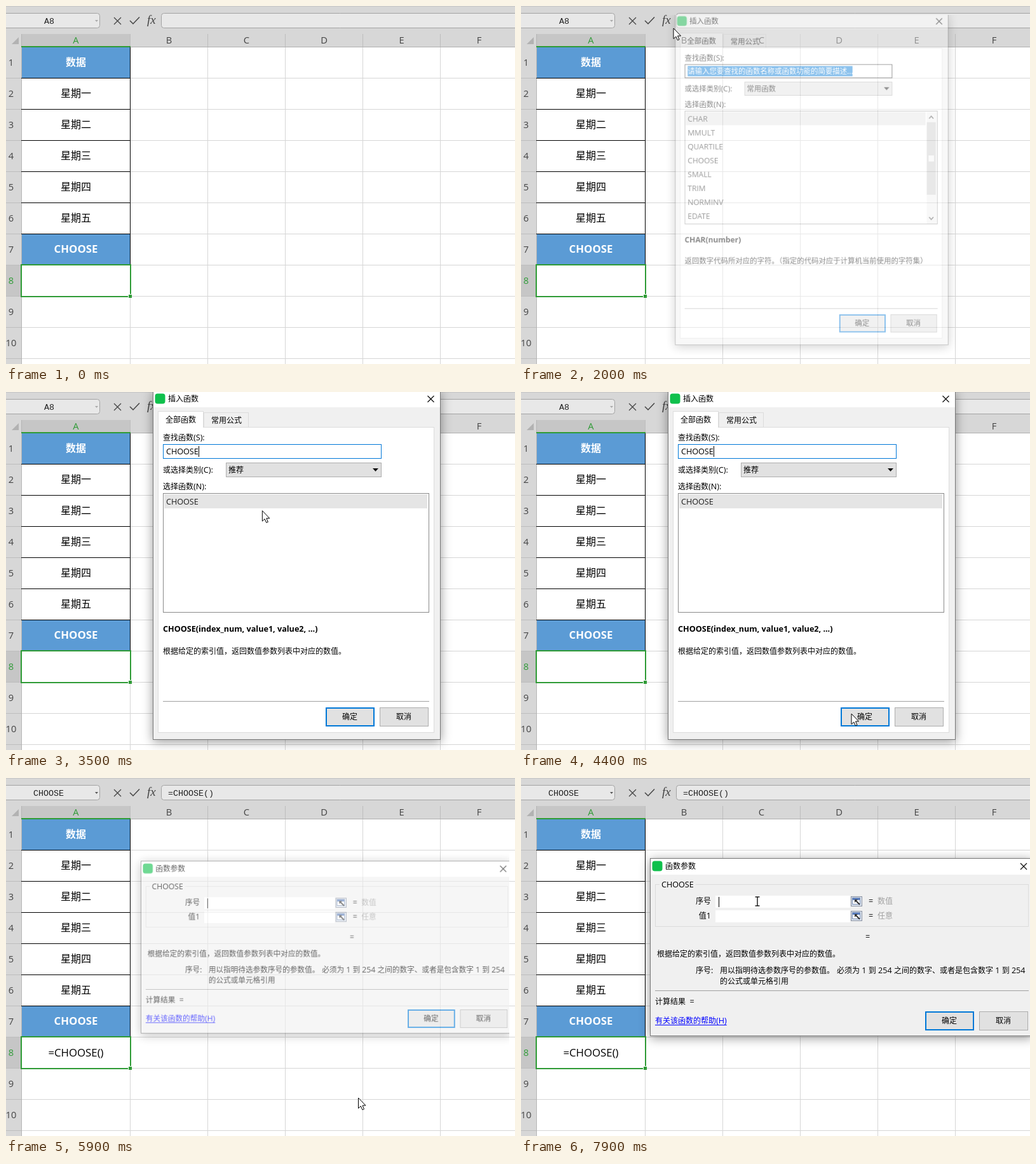
Animation of 801x563 px, one loop 8000 ms. Source, as an HTML page with a canvas:

```html
<!DOCTYPE html>
<html lang="zh">
<head>
<meta charset="utf-8">
<style>
html, body { margin: 0; width: 100%; height: 100%; overflow: hidden; background: #fff; }
canvas { display: block; }
</style>
</head>
<body>
<canvas id="stage" width="801" height="563"></canvas>
<script>
const W = 801, H = 563, LOOP = 8000, STEP = 100;
const SANS = '"Open Sans", "Noto Sans CJK SC", "Noto Sans CJK", "Noto Sans", sans-serif';
const MONO = '"Liberation Mono", monospace';
const BLUE = '#0078d7', GREEN = '#2f9b36';
const screen = document.getElementById('stage').getContext('2d');
const layer = Object.assign(document.createElement('canvas'), { width: W, height: H }).getContext('2d');
let g = screen;

function fill(x, y, w, h, color) {
  g.fillStyle = color;
  g.fillRect(x, y, w, h);
}

// Box whose border lies inside its outer size.
function box(x, y, w, h, back, border, weight = 1) {
  fill(x, y, w, h, border);
  fill(x + weight, y + weight, w - 2 * weight, h - 2 * weight, back);
}

function rounded(x, y, w, h, r, back, border) {
  g.beginPath();
  g.roundRect(x, y, w, h, r);
  g.fillStyle = back;
  g.fill();
  if (border) { g.strokeStyle = border; g.lineWidth = 1; g.stroke(); }
}

function path(points, { back, line, width = 1, close = false }) {
  g.beginPath();
  points.forEach(([x, y]) => g.lineTo(x, y));
  if (close) g.closePath();
  if (back) { g.fillStyle = back; g.fill(); }
  if (line) { g.strokeStyle = line; g.lineWidth = width; g.stroke(); }
}

// Latin runs are set slightly larger than the CJK runs beside them.
function text(str, x, y, { size = 12, color = '#000', weight = 400, align = 0 } = {}) {
  const runs = str.match(/[\u2e80-\uffef]+|[^\u2e80-\uffef]+/g) || [];
  const parts = runs.map(run => {
    const font = `${weight} ${/[\u2e80-\uffef]/.test(run) ? size : size * 1.05}px ${SANS}`;
    g.font = font;
    return { run, font, width: g.measureText(run).width };
  });
  const total = parts.reduce((sum, p) => sum + p.width, 0);
  let left = x - total * align;
  g.fillStyle = color;
  for (const p of parts) {
    g.font = p.font;
    g.fillText(p.run, left, y);
    left += p.width;
  }
  return total;
}

function mono(str, x, y) {
  g.font = `13.33px ${MONO}`;
  g.fillStyle = '#222';
  g.fillText(str, x, y);
}

function cross(x, y, r, color, width) {
  path([[x - r, y - r], [x + r, y + r]], { line: color, width });
  path([[x + r, y - r], [x - r, y + r]], { line: color, width });
}

function button(label, x, y, state) {
  if (state === 'default') box(x, y, 77, 30, '#e1e1e1', BLUE, 2);
  else if (state === 'hover') box(x, y, 77, 30, '#e5f1fb', BLUE);
  else box(x, y, 77, 30, '#e1e1e1', '#adadad');
  text(label, x + 38, y + 19, { align: 0.5 });
}

const between = (t, a, b) => t >= a && t < b;
const blink = (t, start) => Math.floor((t - start) / 500) % 2 === 0;

function toolbar(t) {
  const editing = t >= 5900;
  fill(0, 0, W, 65, '#d7d7d7');
  fill(0, 0, W, 1, '#c6c6c6');
  rounded(-4.5, 11.5, 152, 23, 4, '#e8e8e8', '#a3a3a3');
  rounded(244.5, 11.5, 580, 23, 4, '#e8e8e8', '#a3a3a3');
  mono(editing ? 'CHOOSE' : 'A8', editing ? 43 : 60, 28);
  path([[140, 22], [145, 22], [142.5, 25]], { back: editing ? '#555' : '#aaa', close: true });
  if (between(t, 1600, 2000)) rounded(216, 11, 24, 24, 4, '#a0a0a0');
  cross(175.5, 23.5, 5.5, '#444', 1.3);
  path([[195, 23], [200, 28], [210, 17.5]], { line: '#444', width: 1.5 });
  g.font = 'italic 19px "Liberation Serif", serif';
  g.fillStyle = '#444';
  g.fillText('fx', 222, 28);
  if (editing) mono('=CHOOSE()', 255, 28);
}

function sheet(t) {
  fill(0, 0, W, H, '#fff');
  toolbar(t);
  fill(0, 65, 24, H, '#d7d7d7');
  fill(25, 44, 171, 20, '#c6c6c6');
  fill(0, 408, 24, 49, '#c6c6c6');
  fill(24, 64, W, 1, '#b0b0b0');
  fill(24, 44, 1, H, '#b5b5b5');
  path([[20, 49], [20, 60], [9, 60]], { back: '#b2b2b2', close: true });

  for (let i = 0; i < 5; i++) {
    fill(195 + 122 * i, 44, 1, 20, '#bdbdbd');
    fill(195 + 122 * i, 65, 1, H, '#d6d6d6');
  }
  [...'ABCDEF'].forEach((name, i) =>
    text(name, i ? 134.5 + 122 * i : 110, 59, { size: 14, color: i ? '#444' : GREEN, align: 0.5 }));

  const cells = ['数据', '星期一', '星期二', '星期三', '星期四', '星期五', 'CHOOSE'];
  for (let row = 0; row < 11; row++) {
    const top = 64 + 49 * row;
    fill(0, top + 49, 24, 1, '#bdbdbd');
    fill(25, top + 49, W, 1, '#d6d6d6');
    if (row < 10) text(`${row + 1}`, 8, top + 30, { size: 14, color: row === 7 ? GREEN : '#444', align: 0.5 });
  }
  cells.forEach((label, row) => {
    const top = 64 + 49 * row, head = row === 0 || row === 6;
    if (head) fill(25, top + 1, 170, 48, '#5b9bd5');
    fill(24, top + 49, 172, 1, '#000');
    fill(195, top + 1, 1, 49, '#000');
    text(label, 110, top + 30, { size: 16, color: head ? '#fff' : '#000', weight: head ? 700 : 400, align: 0.5 });
  });

  fill(24, 63, 172, 2, GREEN);
  g.strokeStyle = GREEN;
  g.lineWidth = 2;
  g.strokeRect(24, 407, 172, 50);
  fill(192, 453, 6, 6, '#fff');
  fill(193, 454, 5, 5, GREEN);
  if (t >= 5900) text('=CHOOSE()', 110, 438, { size: 16, align: 0.5 });
  else if (between(t, 800, 1200) || between(t, 1700, 2000)) fill(110, 421, 1, 23, '#000');
}

function windowFrame(x, y, w, h, title) {
  g.save();
  g.shadowColor = 'rgba(0,0,0,.4)';
  g.shadowBlur = 16;
  g.shadowOffsetY = 3;
  fill(x, y, w, h, '#777');
  g.restore();
  fill(x + 1, y + 1, w - 2, h - 2, '#f0f0f0');
  fill(x + 1, y + 1, w - 2, 25, '#fff');
  rounded(x + 3.5, y + 4.5, 16, 16, 4, '#0fc04c');
  text(title, x + 24, y + 17);
}

function searchDialog(t) {
  const searched = t >= 3100, clicked = t >= 5600;
  windowFrame(231, -2, 453, 549, '插入函数');
  cross(668.5, 11, 5, '#111', 1.2);
  box(239, 55, 435, 481, '#fff', '#dcdcdc');
  box(311, 32, 71, 24, '#f0f0f0', '#dcdcdc');
  box(239, 30, 72, 26, '#fff', '#dcdcdc');
  fill(240, 55, 70, 2, '#fff');
  text('全部函数', 251, 48);
  text('常用公式', 323, 49);

  text('查找函数(S):', 247, 76);
  box(247, 82, 344, 23, '#fff', clicked ? '#999' : t >= 2500 ? BLUE : '#222');
  if (t < 2800) {
    fill(252, 85, 273, 17, BLUE);
    text('请输入您要查找的函数名称或函数功能的简要描述...', 252, 98, { color: '#fff' });
  } else {
    const typed = 'CHOOSE'.slice(0, searched ? 6 : t >= 2900 ? 3 : 1);
    const width = text(typed, 252, 98);
    if (!clicked && (!searched || blink(t, 3100))) fill(Math.round(252 + width), 85, 1, 17, '#000');
  }

  text('或选择类别(C):', 247, 127);
  box(346, 111, 245, 23, '#e1e1e1', '#adadad');
  text(searched ? '推荐' : '常用函数', 350, 127);
  path([[577, 120], [586, 120], [581.5, 125]], { back: '#111', close: true });

  text('选择函数(N):', 247, 153);
  box(247, 159, 419, 188, '#fff', '#8a8a8a');
  fill(249, 161, searched ? 414 : 397, 22, '#e5e5e5');
  const names = searched ? ['CHOOSE']
    : ['CHAR', 'MMULT', 'QUARTILE', 'CHOOSE', 'SMALL', 'TRIM', 'NORMINV', 'EDATE'];
  names.forEach((name, i) => text(name, 252, 177 + 23 * i, { color: '#222' }));
  if (!searched) {
    fill(648, 161, 16, 185, '#f0f0f0');
    fill(648, 178, 15, 120, '#cdcdcd');
    fill(651, 233, 9, 10, '#f4f4f4');
    path([[652, 172], [655.5, 168], [659, 172]], { line: '#444', width: 1.6 });
    path([[652, 335], [655.5, 339], [659, 335]], { line: '#444', width: 1.6 });
  }

  text(searched ? 'CHOOSE(index_num, value1, value2, ...)' : 'CHAR(number)', 247, 377, { weight: 700 });
  text(searched ? '根据给定的索引值，返回数值参数列表中对应的数值。'
    : '返回数字代码所对应的字符。（指定的代码对应于计算机当前使用的字符集）', 247, 412);
  fill(247, 486, 419, 1, '#a0a0a0');
  button('确定', 503, 496, clicked ? 'hover' : 'default');
  button('取消', 588, 496);
}

function argument(label, hint, y) {
  text(label, 299, y + 13, { align: 1 });
  fill(306, y, 212, 19, '#fff');
  box(519, y + 1, 18, 16, '#dbe3ee', '#8b93a3');
  box(521, y + 3, 13, 11, '#fff', '#7a8fb4');
  fill(522, y + 4, 11, 3, '#5b7fc0');
  path([[526, y + 7], [533, y + 14]], { line: '#333', width: 2 });
  path([[525, y + 6], [530, y + 6], [525, y + 11]], { back: '#333', close: true });
  text('=', 547, y + 13);
  text(hint, 561, y + 13, { color: '#a0a0a0' });
}

function argumentsDialog(t) {
  windowFrame(203, 126, 602, 280, '函数参数');
  cross(791, 139, 5, '#111', 1.2);
  box(211, 167, 588, 67, '#f0f0f0', '#dcdcdc');
  fill(218, 164, 57, 8, '#f0f0f0');
  text('CHOOSE', 221, 172);
  argument('序号', '数值', 185);
  argument('值1', '任意', 208);
  if (blink(t, 5700)) fill(311, 187, 1, 16, '#000');
  text('=', 542, 254);
  text('根据给定的索引值，返回数值参数列表中对应的数值。', 214, 281);
  text('序号:', 275, 307);
  text('用以指明待选参数序号的参数值。', 313, 307);
  text('必须为 1 到 254 之间的数字、或者是包含数字 1 到 254', 497, 307);
  text('的公式或单元格引用', 313, 324);
  fill(211, 334, 588, 1, '#a0a0a0');
  text('计算结果  =', 211, 356);
  const width = text('有关该函数的帮助(H)', 211, 386, { color: '#00f' });
  fill(211, 388, width, 1, '#00f');
  button('确定', 636, 367, 'default');
  button('取消', 721, 367);
}

function composite(draw, t, alpha, scale, cx, cy) {
  layer.clearRect(0, 0, W, H);
  g = layer;
  draw(t);
  g = screen;
  g.save();
  g.globalAlpha = alpha;
  g.translate(cx, cy);
  g.scale(scale, scale);
  g.drawImage(layer.canvas, -cx, -cy);
  g.restore();
}

const pointers = {
  arrow() {
    path([[0, 0], [0, 16.5], [3.8, 13], [6.4, 18.8], [9, 17.7], [6.5, 12], [11.5, 12]],
      { back: '#fff', line: '#000', close: true });
  },
  plus() {
    const a = 2.5, b = 9;
    path([[-a, -b], [a, -b], [a, -a], [b, -a], [b, a], [a, a], [a, b], [-a, b], [-a, a], [-b, a], [-b, -a], [-a, -a]],
      { back: '#fff', line: '#333', close: true });
  },
  beam() {
    path([[0, -7], [0, 7]], { line: '#000', width: 1.3 });
    for (const y of [-7, 7]) path([[-3.5, y], [3.5, y]], { line: '#000', width: 1.3 });
  }
};

// Each stroke: shape, then [time, x, y] stops joined by straight moves.
const strokes = [
  ['plus', [100, 635, 101], [300, 235, 330], [400, 60, 405], [450, 30, 412], [600, 110, 428], [1000, 110, 428], [1300, 150, 250], [1450, 210, 90]],
  ['arrow', [1500, 220, 50], [1700, 233, 23], [1800, 233, 23], [2000, 240, 35], [2300, 318, 92]],
  ['beam', [2400, 329, 104], [2600, 329, 94], [2700, 329, 94]],
  ['beam', [3200, 329, 94], [3300, 340, 96]],
  ['arrow', [3400, 365, 130], [3700, 480, 300], [4000, 579, 425], [4100, 565, 432], [4400, 520, 506], [4700, 539, 512], [5800, 539, 512],
    [6000, 570, 494], [6100, 570, 494], [6300, 621, 430], [6700, 492, 299], [7000, 524, 333], [7200, 518, 322], [7300, 518, 322], [7500, 430, 240]],
  ['beam', [7600, 385, 200], [7700, 372, 187], [7800, 372, 187], [7900, 372, 194]]
];

function pointer(t) {
  const stroke = strokes.find(([, ...s], i) => {
    const next = strokes[i + 1];
    const hidden = s[0][0] === 2400;
    return t >= s[0][0] && t < (hidden ? 2800 : next ? next[1][0] : LOOP);
  });
  if (!stroke) return;
  const [shape, ...stops] = stroke;
  const i = stops.findLastIndex(s => s[0] <= t);
  const [t0, x0, y0] = stops[i], [t1, x1, y1] = stops[i + 1] || [t0 + 1, x0, y0];
  const k = (t - t0) / (t1 - t0);
  const still = !stops[i + 1];
  g.save();
  g.translate(still ? x0 : x0 + (x1 - x0) * k, still ? y0 : y0 + (y1 - y0) * k);
  pointers[shape]();
  g.restore();
}

function render(now) {
  const t = Math.floor((now % LOOP) / STEP) * STEP;
  g = screen;
  sheet(t);
  if (between(t, 2000, 5900)) {
    const [alpha, scale] = t === 2000 ? [0.45, 0.95]
      : t === 5700 ? [0.87, 0.989]
      : t === 5800 ? [0.3, 0.95] : [1, 1];
    composite(searchDialog, t, alpha, scale, 457.5, 273);
  }
  if (t >= 5900) composite(argumentsDialog, t, t === 5900 ? 0.6 : 1, t === 5900 ? 0.97 : 1, 504, 266);
  pointer(t);
}

const start = performance.now();
function tick() {
  render(performance.now() - start);
  requestAnimationFrame(tick);
}
tick();
</script>
</body>
</html>
```
